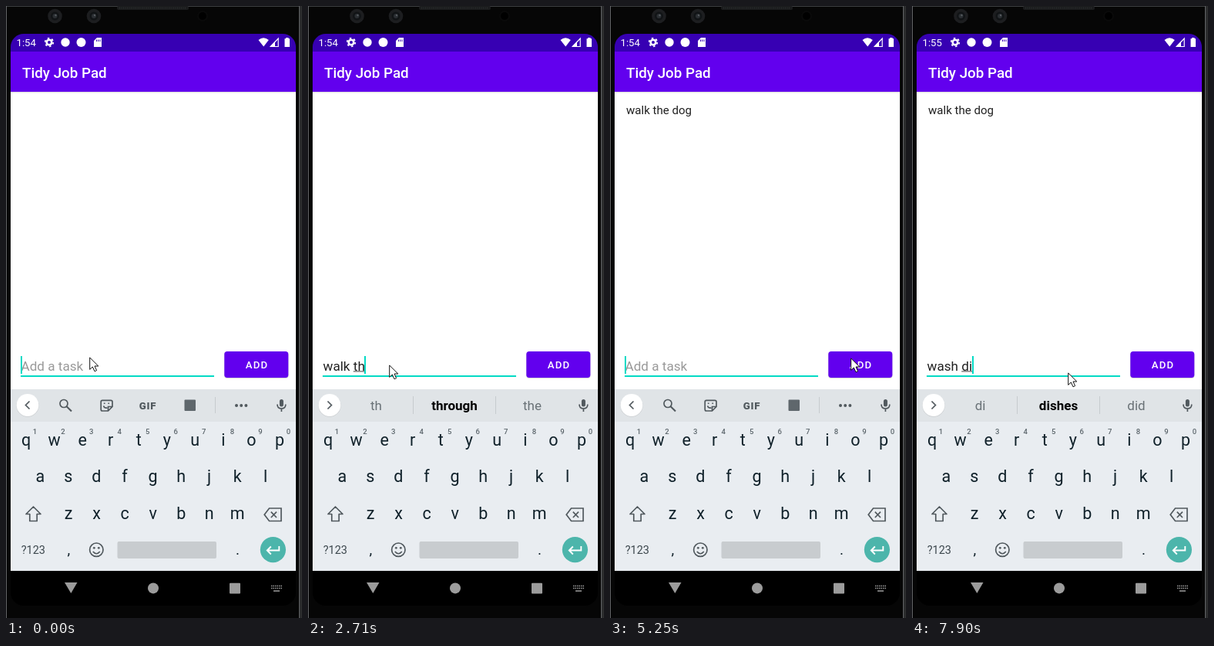
Write an HTML page that moves like this. It is 384 px wide and 792 px high and loops after 8000 ms.

```html
<!DOCTYPE html>
<html lang="en">
<head>
<meta charset="utf-8">
<title>Task list</title>
<style>
  html, body { margin: 0; width: 100%; height: 100%; overflow: hidden; background: #000; }
  svg { display: block; width: 384px; height: 792px; font-family: Roboto, sans-serif; }
  text { white-space: pre; }
  .mid { text-anchor: middle; }
  .icon { fill: none; stroke: #51595e; stroke-width: 1.7; }
  .key { font-size: 21.5px; fill: #10212a; }
  .num { font-size: 9.5px; fill: #5b656b; font-weight: 500; }
  .sug { font-size: 17px; fill: #697176; }
  .bold { font-weight: 700; fill: #000; }
</style>
</head>
<body>
<svg viewBox="0 0 384 792">
  <defs>
    <linearGradient id="shade" x2="0" y2="1">
      <stop stop-color="#000" stop-opacity=".16"/><stop offset="1" stop-color="#000" stop-opacity="0"/>
    </linearGradient>
    <clipPath id="screen"><rect x="6" y="36" width="370" height="740" rx="17"/></clipPath>
  </defs>

  <!-- phone body -->
  <rect width="384" height="792" fill="#060606"/>
  <path d="M0 .5H384" stroke="#3c3e40"/>
  <path d="M.5 0V792M380.5 0V792" stroke="#626466"/>
  <rect x="381" width="3" height="792" fill="#2c2d2e"/>
  <rect x="144" width="93" height="5" rx="2" fill="#1b1c1d"/>
  <path d="M147 2.5H234" stroke="#2b2c2e" stroke-dasharray="1 1.5" stroke-width="2"/>
  <g id="lenses"></g>
  <circle cx="255" cy="13" r="7" fill="#0a0a0a"/><circle cx="255" cy="13" r="5" fill="#000"/>

  <g clip-path="url(#screen)">
    <rect x="6" y="36" width="370" height="23" fill="#3700b3"/>
    <rect x="6" y="59" width="370" height="52" fill="#6200ee"/>
    <rect x="6" y="111" width="370" height="385" fill="#fff"/>
    <rect x="6" y="111" width="370" height="2" fill="url(#shade)"/>
    <rect x="6" y="496" width="370" height="42" fill="#e0e4e7"/>
    <rect x="6" y="538" width="370" height="193" fill="#e9edf1"/>
    <rect x="6" y="731" width="370" height="45" fill="#000"/>

    <!-- status bar -->
    <g fill="#fff">
      <text id="clock" x="13.5" y="52" font-size="13.2">1:54</text>
      <circle cx="56" cy="47" r="3.3" fill="none" stroke="#fff" stroke-width="2.6"/>
      <circle cx="56" cy="47" r="5.3" fill="none" stroke="#fff" stroke-width="1.7" stroke-dasharray="2.4 3.15"/>
      <circle cx="77" cy="47" r="5.7"/>
      <circle cx="97.5" cy="47" r="6"/>
      <path d="M118 41H124V53H114V45Z"/>
      <path d="M117.5 43.5V46M119.7 43.5V46M122 43.5V46" stroke="#3700b3" stroke-width="1"/>
      <path d="M327.5 44Q334 38.5 340.8 44L334.2 52.5Z"/>
      <path d="M353.2 42V52.5H343.2Z" fill="none" stroke="#fff" stroke-width="1.2"/>
      <path d="M349 46V52.5H343Z"/>
      <path d="M363 41H366.5V42.2H368V53H361.5V42.2H363Z"/>
    </g>

    <text x="21" y="92.5" font-size="18.8" font-weight="500" fill="#fff">Tidy Job Pad</text>
    <text id="item" x="21" y="140" font-size="15.07" fill="#212121">walk the dog</text>

    <!-- entry row -->
    <text id="entry" x="19.5" y="471.5" font-size="17.15"></text>
    <rect id="under" x="19" y="472.4" height="1" fill="#444"/>
    <rect x="19" y="478" width="251" height="2" fill="#03dac5"/>
    <rect id="caret" y="453" width="2" height="23" fill="#03dac5"/>
    <rect id="lift" x="283" y="448" width="83.5" height="34" rx="4" fill="#000" opacity=".16"/>
    <rect x="283.3" y="447" width="83" height="34" rx="3.7" fill="#6200ee"/>
    <rect id="glow" x="283.3" y="447" width="83" height="34" rx="3.7" fill="#fff"/>
    <text x="325.5" y="469" font-size="13.2" font-weight="500" letter-spacing="1.18" fill="#fff" class="mid">ADD</text>

    <!-- strip above the keys -->
    <circle cx="28" cy="517.2" r="14.6" fill="#000" opacity=".1"/>
    <circle cx="28" cy="516.5" r="14.4" fill="#fff"/>
    <path id="chevron" class="icon" stroke-width="1.8"/>
    <g id="tools">
      <g class="icon">
        <circle cx="75" cy="514.5" r="5"/><path d="M78.7 518.2L85 524.5" stroke-width="2.1"/>
        <path d="M125 510.3H136Q138 510.3 138 512.3V518.5L132.5 524H125Q123.2 524 123.2 522V512.3Q123.2 510.3 125 510.3ZM137.5 518.5H132.5V524"/>
        <path d="M126.5 517.5Q128 521 131.5 520M127.7 513.5V515M133.2 513.5V515"/>
      </g>
      <text x="184" y="521.5" class="mid" font-size="13.2" font-weight="900" letter-spacing=".8" fill="#51595e">GIF</text>
      <rect x="231.5" y="509.5" width="14.5" height="14.5" rx="1" fill="#5f676c"/>
      <path d="M271.5 506V527" stroke="#c6cbce"/>
      <g fill="#51595e"><circle cx="299" cy="517" r="2"/><circle cx="305.2" cy="517" r="2"/><circle cx="311.4" cy="517" r="2"/></g>
    </g>
    <g id="words">
      <path d="M136.5 505V528M243.5 505V528" stroke="#c6cbce"/>
      <text class="sug mid" x="88.5" y="523"></text>
      <text class="sug mid" x="190" y="523"></text>
      <text class="sug mid" x="291" y="523"></text>
      <g id="dog">
        <path d="M184 515Q192 513 195 516Q199 515 196 512Q193 508 197 507.5Q202 509 200 515Q199 518 199.5 526.5H195.5L194.5 522H189L188 526.5H184Z" fill="#f2b75c"/>
        <path d="M180.5 513L181.5 507.5L185 509.5H188L191.5 507.5L192 514Q191 520 186 520Q181.5 519 180.5 513Z" fill="#e39d40"/>
        <path d="M182.5 516Q186 512.5 189.5 516Q188.5 519.5 186 519.5Q183.5 519.5 182.5 516ZM186 520.5H190.5L189 525H186ZM197 510L199 511.5L197.5 513Z" fill="#fff3dc"/>
        <path d="M183.2 513.3H184.7M187.5 513.3H189M185.2 516H187" stroke="#503522" stroke-width="1.4"/>
      </g>
    </g>
    <rect x="354.9" y="509" width="5" height="9.5" rx="2.5" fill="#51595e"/>
    <path class="icon" d="M352 515.5Q352 521 357.4 521T362.8 515.5M357.4 521V525"/>

    <!-- keyboard -->
    <g id="keys"></g>
    <g class="icon">
      <path d="M35.5 648L45 657.5H40.2V666.5H30.8V657.5H26Z" stroke-linejoin="round"/>
      <path d="M341.5 650H357V666.5H341.5L335.2 658.2ZM343.8 654.7L351 662M351 654.7L343.8 662"/>
      <circle cx="117.3" cy="703.7" r="8.7"/>
      <path d="M112.8 706Q117.3 711.5 121.8 706"/>
    </g>
    <circle cx="114.3" cy="701.3" r="1.4" fill="#51595e"/><circle cx="120.3" cy="701.3" r="1.4" fill="#51595e"/>
    <text x="35.3" y="709" class="mid" font-size="14.5" fill="#3c474d">?123</text>
    <text x="81.3" y="710" class="mid" font-size="19" fill="#10212a">,</text>
    <text x="300.5" y="710" class="mid" font-size="19" fill="#10212a">.</text>
    <rect x="144.5" y="693" width="128.5" height="22" rx="2" fill="#c8cccf"/>
    <circle cx="346.4" cy="703.6" r="16.6" fill="#4cb5ab"/>
    <path d="M354.3 699V704.5H339M343.8 699.5L338.8 704.5L343.8 709.5" fill="none" stroke="#fff" stroke-width="1.9"/>

    <!-- navigation bar -->
    <g fill="#9c9c9c">
      <path d="M76 746H92.5L84.3 760Z"/><circle cx="191" cy="753.4" r="7"/><rect x="290" y="746.8" width="14" height="13.8" rx="1"/>
    </g>
    <path d="M344 750.5H358M344 753.5H358" stroke="#9c9c9c" stroke-width="1.5" stroke-dasharray="1.5 1"/>
    <path d="M347 757H355" stroke="#9c9c9c" stroke-width="1.5"/>
  </g>

  <path id="mouse" d="M.7 1V16.4L4.3 13L7 18.8L9.6 17.6L7 12H11.8Z" fill="#fff" stroke="#111" stroke-width="1"/>
</svg>

<script>
const LOOP = 8000;
const $ = id => document.getElementById(id);

$('lenses').innerHTML = [63.5, 114].map(x =>
  `<circle cx="${x}" cy="13" r="9.3" fill="#1d1e20"/><circle cx="${x}" cy="13" r="5.5" fill="#111416"/>
   <circle cx="${x}" cy="13" r="3" fill="#2b2f33"/><circle cx="${x + 1}" cy="12" r="1.2" fill="#555a5f"/>`).join('');

const row = (letters, x, y) => [...letters].map((c, i) =>
  `<text class="key mid" x="${x + i * 36.55}" y="${y}">${c}</text>`).join('');
const digits = [...'1234567890'].map((c, i) =>
  `<text class="num mid" x="${37.5 + i * 36.55}" y="554">${c}</text>`).join('');
$('keys').innerHTML = row('qwertyuiop', 26, 569) + digits + row('asdfghjkl', 44.3, 616) + row('zxcvbnm', 81, 664);

// time, typed text, suggestions (* marks the bold one, @ the picture)
const typing = [
  [0, ''], [420, ' '], [540, '  '], [690, ' '], [810, ''],
  [1240, 'w', 'w,*we,what'],
  [1360, 'wa', 'wa,*was,want'],
  [1480, 'wal', 'wal,*walk,wall'],
  [1630, 'walk', 'walk,walking,walked'],
  [1750, 'walk ', 'in,the,to'],
  [2710, 'walk th', 'th,*through,the'],
  [2830, 'walk the', 'the,then,they'],
  [2950, 'walk the ', 'dog,same,first'],
  [3380, 'walk the do', 'do,*dog,down'],
  [3530, 'walk the dog', 'dog,@,dogs'],
  [5130, ''],
  [6710, 'w', 'w,*we,what'],
  [6830, 'wa', 'wa,*was,want'],
  [6960, 'was', "was,wasn't,wash"],
  [7110, 'wash', 'wash,washing,washed'],
  [7260, 'wash ', 'the,and,my'],
  [7780, 'wash d', 'd,*dishes,do'],
  [7900, 'wash di', 'di,*dishes,did']
];
const moves = [
  [0, 108, 454], [120, 107, 458], [270, 105, 464], [4210, 193, 438],
  [4350, 252, 431], [4470, 282, 440], [4590, 289, 447], [4710, 309, 456], [4860, 312, 455],
  [5400, 300, 457], [5520, 262, 463], [5640, 217, 469], [5790, 208, 472], [5910, 204, 473], [6030, 202, 474]
];
const caretOff = [[2310, 2710], [4060, 4470], [4980, 5130], [5640, 6030], [6460, 6710]];
const press = [[0, 0], [4860, .14], [4980, .24], [5130, .1], [5250, 0]];

const at = (list, t) => list.findLast(s => s[0] <= t);
const show = (el, on) => el.setAttribute('visibility', on ? 'visible' : 'hidden');
const pen = document.createElement('canvas').getContext('2d');
const width = s => { pen.font = '17.15px Roboto, sans-serif'; return pen.measureText(s).width; };
const slots = document.querySelectorAll('.sug');

function drawEntry(text) {
  $('entry').textContent = text || 'Add a task';
  $('entry').setAttribute('fill', text ? '#212121' : '#999');
  const start = text.lastIndexOf(' ') + 1, x = width(text.slice(0, start));
  $('under').setAttribute('x', 19.5 + x);
  $('under').setAttribute('width', width(text) - x);
  $('caret').setAttribute('x', Math.floor(19.5 + width(text)));
}

function drawStrip(list) {
  show($('tools'), !list);
  show($('words'), !!list);
  $('chevron').setAttribute('d', list ? 'M25.5 511.5L30.5 516.5L25.5 521.5' : 'M30.5 511.5L25.5 516.5L30.5 521.5');
  const words = list ? list.split(',') : ['', '', ''];
  words.forEach((w, i) => {
    slots[i].textContent = w.replace(/[*@]/, '');
    slots[i].classList.toggle('bold', w[0] === '*');
  });
  show($('dog'), words[1] === '@');
}

function draw(t) {
  const [, text, list] = at(typing, t);
  drawEntry(text);
  drawStrip(list);
  show($('caret'), !caretOff.some(([a, b]) => t >= a && t < b));
  show($('item'), t >= 5130);
  $('clock').textContent = t < 7380 ? '1:54' : '1:55';
  const [, x, y] = at(moves, t);
  $('mouse').setAttribute('transform', `translate(${x} ${y})`);
  const glow = at(press, t)[1];
  $('glow').setAttribute('opacity', glow);
  $('lift').setAttribute('height', 34 + glow * 25);
}

const begin = performance.now();
(function tick() {
  draw((performance.now() - begin) % LOOP);
  requestAnimationFrame(tick);
})();
</script>
</body>
</html>
```
